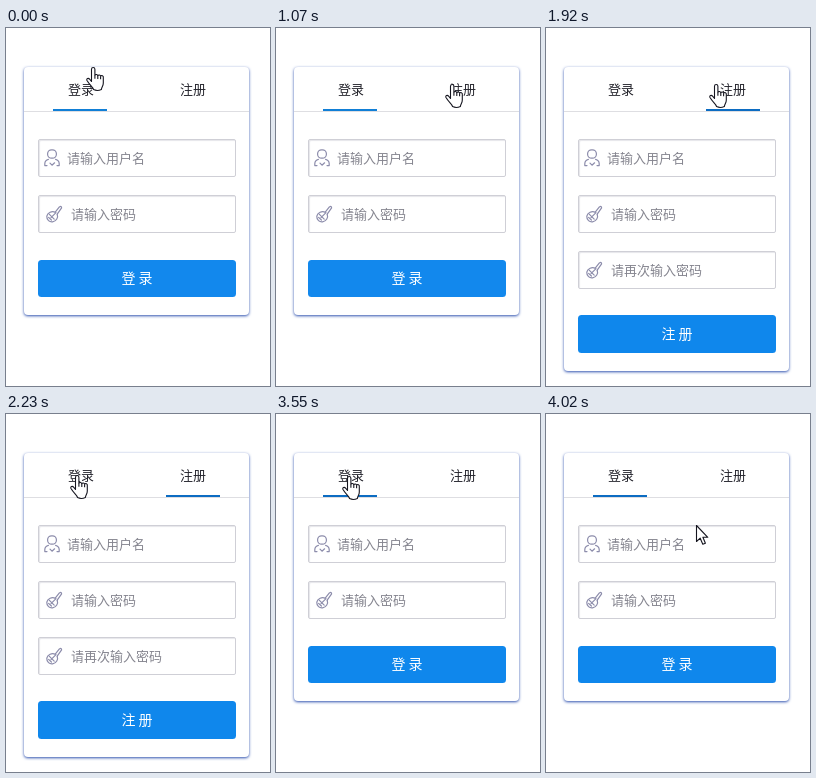
Write an HTML page that moves like this. It is 264 by 358 pixels and loops after 4.95 s.

```html
<!DOCTYPE html>
<html lang="zh-CN">
<head>
<meta charset="utf-8">
<style>
html, body { margin: 0; width: 100%; height: 100%; overflow: hidden; background: #fff; }
#card {
  position: absolute; left: 18px; top: 39px; width: 225px; height: 248px;
  border-radius: 4px; background: #fff; box-shadow: 0 1px 3px #2c4fae;
}
.field {
  position: absolute; left: 32px; width: 198px; height: 38px; box-sizing: border-box;
  border: 1px solid #cfcfd6; border-radius: 2px; background: #fff;
  box-shadow: inset 1px 1px 1px #e6e6ea;
}
svg { position: absolute; left: 0; top: 0; }
text { font: 13px "Noto Sans CJK SC", "Noto Sans CJK", sans-serif; fill: #24242c; }
.hint { fill: #85858f; }
.label { font-size: 14px; font-weight: 500; fill: #fff; }
.mid { text-anchor: middle; }
.icon { fill: none; stroke: #8c8cab; stroke-width: 1.2; stroke-linecap: round; stroke-linejoin: round; }
.pointer { fill: #fff; stroke: #15151f; stroke-width: 1.1; stroke-linejoin: round; }
</style>
</head>
<body>
<div id="card"></div>
<div class="field" style="top:111px"></div>
<div class="field" style="top:167px"></div>
<div class="field" id="again" style="top:223px"></div>
<svg width="264" height="358" viewBox="0 0 264 358">
  <defs>
    <g id="key" class="icon">
      <path d="M49.2 184.2L53.4 178.9Q55.4 177.7 55.6 179.8L51.2 186.2"/>
      <path d="M49.2 184.2C46 182.6 41.6 184.4 40.8 188.2C40.6 192 43.6 194.2 46.6 193.8C50.4 193.2 52.4 189.4 51.2 186.2"/>
      <path d="M43.4 186.4L48.2 191.2M45 189.6L50 184.6M42.6 189.4L45.4 192"/>
    </g>
  </defs>
  <path d="M18 83.5H243" stroke="#dedee2"/>
  <rect id="line" y="81" width="54" height="2"/>
  <text class="mid" x="75" y="66">登录</text>
  <text class="mid" x="187" y="66">注册</text>

  <g class="icon">
    <rect x="41.6" y="121.8" width="8.8" height="8.4" rx="4"/>
    <path d="M38.8 137.6V135.6Q39 132.2 42.4 131.4M49.6 131.4Q53 132.2 53.2 135.6V137.6M38.8 137.6H41M51 137.6H53.2M44 135.2L46 137.2L48.6 134.8"/>
  </g>
  <text class="hint" x="61" y="135">请输入用户名</text>
  <use href="#key"/>
  <text class="hint" x="65" y="191">请输入密码</text>
  <g id="repeat">
    <use href="#key" y="56"/>
    <text class="hint" x="65" y="247">请再次输入密码</text>
  </g>

  <rect id="button" x="32" width="198" rx="3.5"/>
  <text id="label" class="label mid" x="131"></text>

  <g id="cursor" class="pointer">
    <g id="hand" transform="translate(-6 0)">
      <path d="M5.5 14.5V2.2a1.7 1.7 0 0 1 3.4 0V8.2a1.6 1.6 0 0 1 2.9.4a1.6 1.6 0 0 1 2.8.6a1.5 1.5 0 0 1 2.7 1.2V16C17.3 19 15.7 20 15.4 22.4Q11.4 24.4 7.6 22.6C7 20 3.5 18 1 13.6C0 11.6 2.4 10.6 3.6 12.2z"/>
      <path fill="none" d="M8.9 8.2v3.6M11.8 8.6v3.4M14.6 9.2v3"/>
    </g>
    <path id="arrow" d="M.5.5V16.5L4.2 13.2L6.8 19.3L9.4 18.2L6.9 12.3H11.8z"/>
  </g>
</svg>
<script>
const LOOP = 4950, HEADER_END = 84;
const START = [86, 39];
const moves = [
  { from: 610, to: 1070, steps: 7, end: [175, 56] },
  { from: 1920, to: 2230, steps: 5, end: [70, 61] },
  { from: 3550, to: 4020, steps: 7, end: [150, 111] }
];
const views = {
  login: { height: 248, line: 47, top: 232, size: 37, base: 255, label: "登 录" },
  signup: { height: 304, line: 160, top: 287, size: 38, base: 311, label: "注 册" }
};

const $ = id => document.getElementById(id);
const set = (id, attrs) => {
  for (const name in attrs) $(id).setAttribute(name, attrs[name]);
};
const show = (id, on) => { $(id).style.display = on ? "" : "none"; };
const ease = x => x * x * x * (x * (6 * x - 15) + 10);

function cursorAt(t) {
  let pos = START;
  for (const m of moves) {
    if (t < m.from) break;
    const gap = (m.to - m.from) / (m.steps - 1);
    const step = Math.min(m.steps, Math.floor((t - m.from) / gap + 0.001) + 1);
    const k = ease(step / m.steps);
    pos = pos.map((p, i) => Math.round(p + (m.end[i] - p) * k));
  }
  return pos;
}

function draw(t) {
  const signup = t >= 1310 && t < 2460;
  const v = signup ? views.signup : views.login;
  const clicked = t >= 1310;
  $("card").style.height = v.height + "px";
  show("again", signup);
  show("repeat", signup);
  set("line", { x: v.line, fill: clicked ? "#0c6cc2" : "#117fd6" });
  set("button", { y: v.top, height: v.size, fill: clicked ? "#0f87ec" : "#1288ed" });
  set("label", { y: v.base });
  $("label").textContent = v.label;

  const [x, y] = cursorAt(t);
  set("cursor", { transform: `translate(${x} ${y})` });
  show("hand", y < HEADER_END);
  show("arrow", y >= HEADER_END);
}

const began = performance.now();
function tick() {
  draw((performance.now() - began) % LOOP);
  requestAnimationFrame(tick);
}
tick();
</script>
</body>
</html>
```
